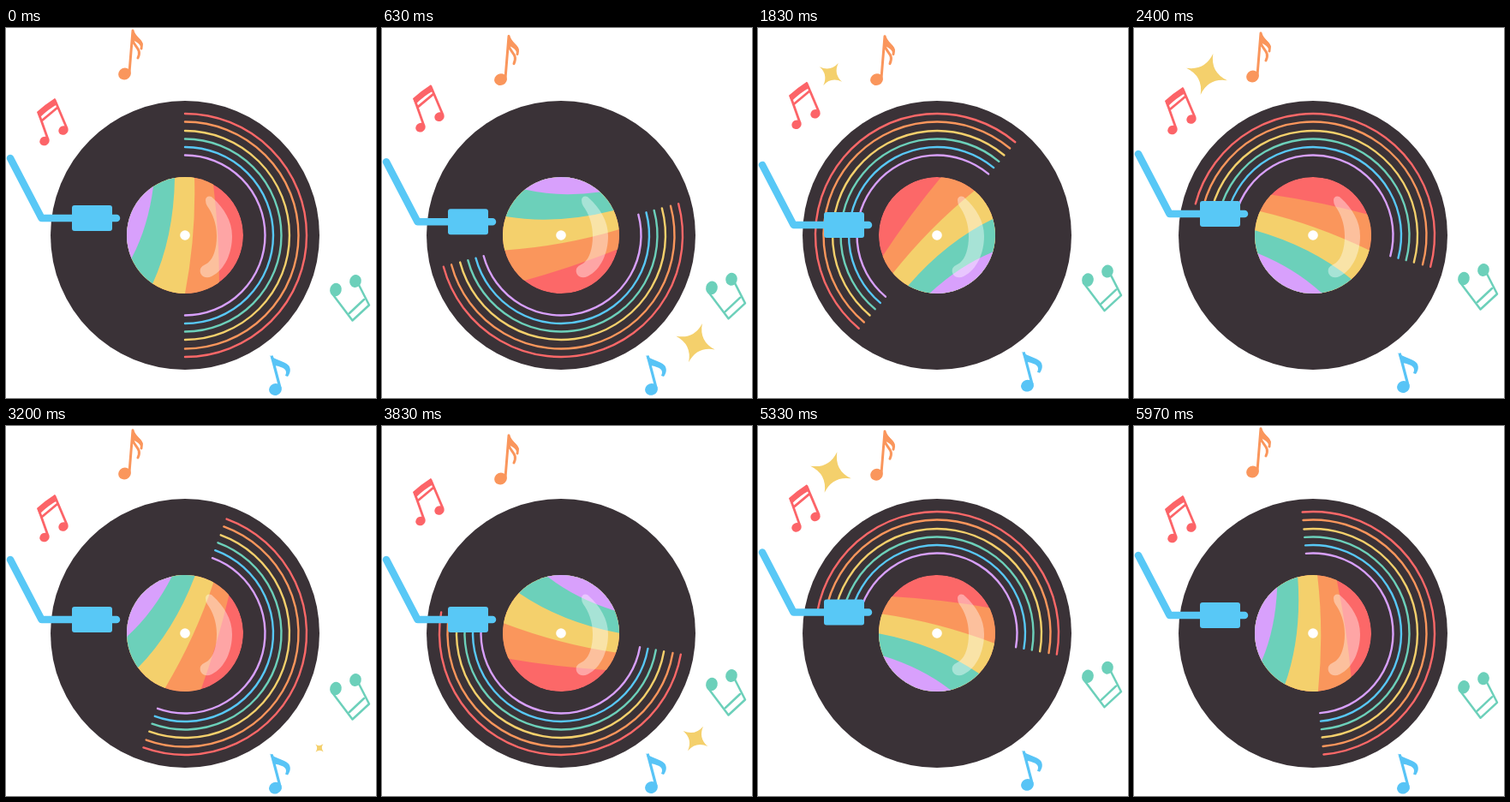
Animation, 432 px wide and 432 px high, one loop 6.01 s. Source, as an HTML page:

```html
<!DOCTYPE html>
<html lang="en">
<head>
<meta charset="utf-8">
<title>Spinning record</title>
<style>
  html, body { margin: 0; height: 100%; overflow: hidden; background: #fff; }
  svg { display: block; width: 100vw; height: 100vh; }
  .line { fill: none; stroke-linecap: round; stroke-linejoin: round; }
</style>
</head>
<body>
<svg viewBox="0 0 432 432">
  <clipPath id="disc"><circle r="68"/></clipPath>

  <g transform="translate(209 242)">
    <circle r="157" fill="#3a3237"/>
    <g id="record">
      <g id="grooves" class="line" stroke-width="2.4"></g>
      <g id="label" clip-path="url(#disc)"><circle r="68" fill="#fc6868"/></g>
    </g>
    <circle r="5.8" fill="#fff"/>
  </g>
  <path fill="#fff" opacity=".4" d="M233 201C233 196 239 195 242 199C254 210 264 225 264 243C264 262 256 282 240 290C232 294 225 288 227 281C229 277 232 277 236 274C242 269 246 258 246 243C246 228 241 216 235 208Q233 205 233 201Z"/>

  <g id="arm" fill="#58c8f6" stroke="#58c8f6">
    <path class="line" stroke-width="8.5" d="M5 152L41.5 222H129"/>
    <rect x="77" y="207" width="47" height="30" rx="3" stroke="none"/>
  </g>

  <g id="orange" fill="#fa965c" stroke="#fa965c">
    <ellipse cx="138.5" cy="53.5" rx="7.5" ry="6.8" transform="rotate(-25 138.5 53.5)" stroke="none"/>
    <path class="line" stroke-width="3" d="M144 52L148 3C150 13 161 14 158 24M147.500 13C150 23 159 24 154 35"/>
    <path stroke="none" d="M147 2C151 10 158 12 160 19L157 22C156 17 150 16 147 13Z"/>
  </g>

  <g id="red" fill="#fc6468" stroke="#fc6468">
    <ellipse cx="45" cy="132" rx="5.800" ry="5.200" transform="rotate(-25 45 132)" stroke="none"/>
    <ellipse cx="67" cy="119.500" rx="5.800" ry="5.200" transform="rotate(-25 67 119.500)" stroke="none"/>
    <path class="line" stroke-width="2.800" d="M38 99L49 130M57 84L71 117M42 108L60 93"/>
    <path stroke="none" d="M36 98Q46 89 57 82L60 89Q49 95 39 105Z"/>
  </g>

  <g id="green" fill="#6cd0ba" stroke="#6cd0ba">
    <ellipse cx="385" cy="305.500" rx="6.800" ry="7.800" transform="rotate(15 385 305.500)" stroke="none"/>
    <ellipse cx="408" cy="295.500" rx="6.800" ry="7.500" transform="rotate(15 408 295.500)" stroke="none"/>
    <path class="line" stroke-width="2.500" d="M380 309L404.500 341.500L424 323.500L412 300M401 333L418 317"/>
  </g>

  <g id="blue" fill="#58c4f6" stroke="#58c4f6">
    <ellipse cx="314.500" cy="422" rx="7.500" ry="6.800" transform="rotate(-20 314.500 422)" stroke="none"/>
    <path class="line" stroke-width="3.200" d="M310.500 384L320 420"/>
    <path stroke="none" d="M308 382C314 388 324 388 330 394C333 398 332 403 329 407L326 406C329 400 326 396 313 394Z"/>
  </g>

  <g fill="#f4d06c">
    <path id="starA"/>
    <path id="starB"/>
  </g>
</svg>

<script>
const LOOP = 6010, FRAMES = 144, HALF = 72;
const $ = id => document.getElementById(id);
const add = (id, markup) => $(id).insertAdjacentHTML('beforeend', markup);

// Half-circle grooves
[[142, '#fc6868'], [132.5, '#fa965c'], [122, '#f4d06c'],
 [112.5, '#6cd0ba'], [103, '#58c8f6'], [93.5, '#d8a0fc']].forEach(([r, colour]) =>
  add('grooves', `<path stroke="${colour}" d="M0 ${-r}A${r} ${r} 0 0 1 0 ${r}"/>`));

// Label bands, right to left: top point, control point, bottom point
[['#fa965c', 33, -60, 40, 0, 40, 58],
 ['#f4d06c', 11, -67, 13, 0, 0, 68],
 ['#6cd0ba', -12, -67, -13, 2, -38, 57],
 ['#d8a0fc', -37, -57, -43, -10, -62, 26]].forEach(([colour, tx, ty, cx, cy, bx, by]) =>
  add('label', `<path fill="${colour}" d="M-80-80H${tx}V${ty}Q${cx} ${cy} ${bx} ${by}V80H-80Z"/>`));

const star = 'M0-1Q.13-.13 1 0Q.13 .13 0 1Q-.13 .13-1 0Q-.13-.13 0-1Z';
$('starA').setAttribute('d', star);
$('starB').setAttribute('d', star);

// Vertical offsets at key moments of the half loop
const keys = [0, 4, 20, 30, 42, 57, 71];
const bob = {
  arm:    [0, 4, 4, 4, 9, -5, -1],
  orange: [0, 2, 8, 7, 7, 3, 0],
  red:    [0, -2, -21, -23, -20, -13, -1],
  green:  [0, 1, -4, -8.5, -11, -13, -0.7],
  blue:   [0, 0.6, 0, 3, -4, -3, 0.6]
};
const starY = [375, 376, 365, 370, 370, 370, 374];

// Smooth periodic curve through the key values
function spline(v, p) {
  const n = keys.length;
  const x = i => keys[(i + n) % n] + HALF * Math.floor(i / n);
  const y = i => v[(i + n) % n];
  const slope = i => (y(i + 1) - y(i - 1)) / (x(i + 1) - x(i - 1));
  let i = n - 1;
  while (keys[i] > p) i--;
  const h = x(i + 1) - x(i), u = (p - x(i)) / h, w = 1 - u;
  return y(i) * w * w * (1 + 2 * u) + y(i + 1) * u * u * (3 - 2 * u)
    + h * u * w * (slope(i) * w - slope(i + 1) * u);
}

function placeStar(id, x, y, size) {
  const r = Math.max(0, size);
  const tilt = 45 - 28 * (r / 25) ** 2;
  $(id).setAttribute('transform', `translate(${x} ${y}) rotate(${tilt}) scale(${r})`);
}

function draw(t) {
  // 24 drawings a second, shown on a 30 Hz clock
  const tick = Math.floor((t + 4) * 0.03);
  const n = Math.min(FRAMES - 1, Math.floor(tick * 0.8 + 1e-6));
  const p = n % HALF;

  $('record').setAttribute('transform', `rotate(${n * 5})`);
  for (const id in bob) $(id).setAttribute('transform', `translate(0 ${spline(bob[id], p)})`);

  const rise = Math.sin(Math.PI / 2 * (p - 34) / 23);
  placeStar('starA', 85, 54, 25 * (p < 34 ? 0 : p < 57 ? rise : (71 - p) / 14));
  placeStar('starB', 366, spline(starY, p), 24 * Math.min(p / 15, (31.3 - p) / 16));
}

const start = performance.now();
function loop() {
  draw((performance.now() - start) % LOOP);
  requestAnimationFrame(loop);
}
loop();
</script>
</body>
</html>
```
